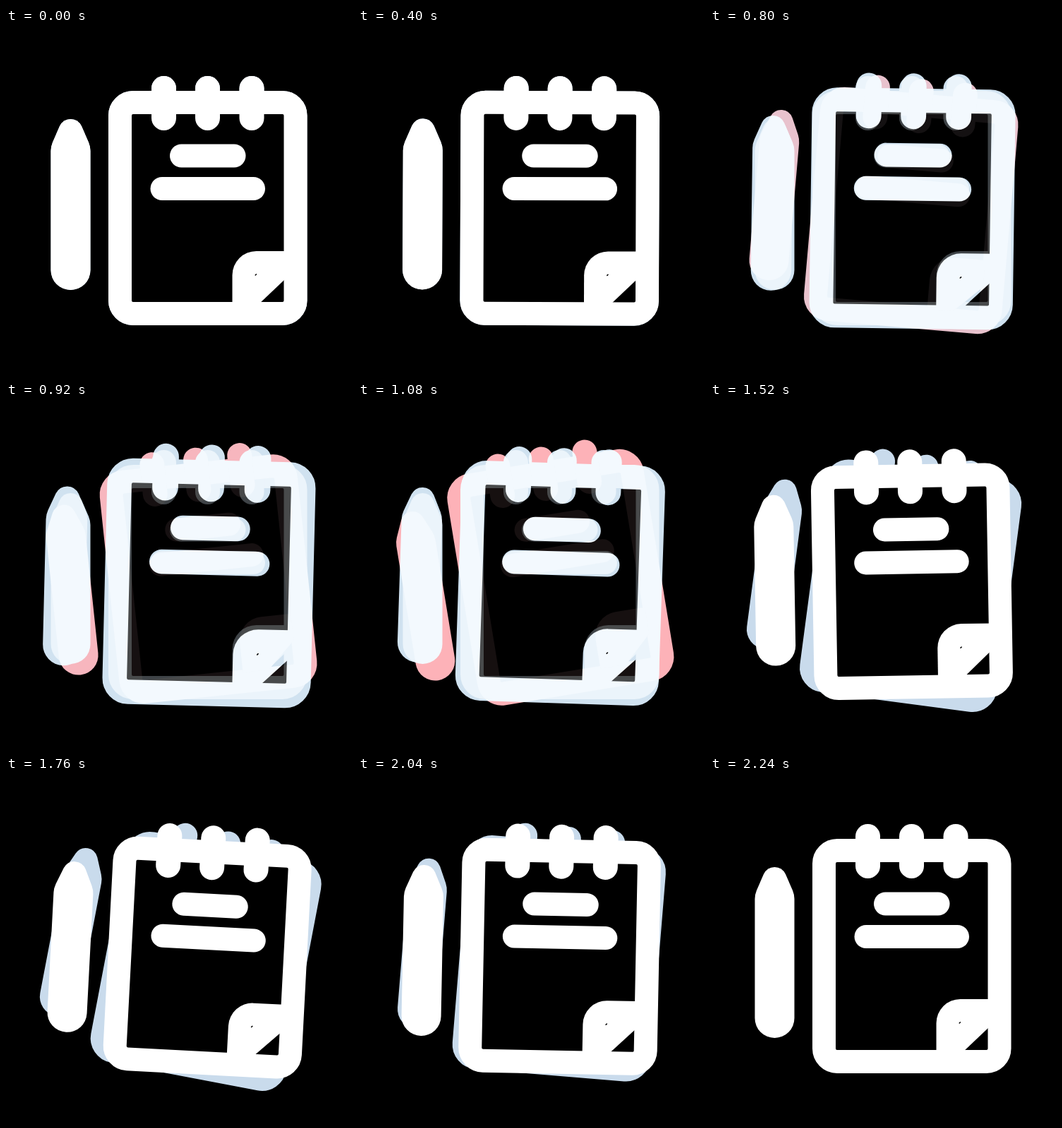
Recreate the animation shown at these times as an HTML page with a canvas. Size 490 by 490 pixels, loop 2.88 s.

```html
<!DOCTYPE html>
<html lang="en">
<head>
<meta charset="utf-8">
<title>Notepad and pen</title>
<style>
  html, body { margin: 0; width: 100%; height: 100%; overflow: hidden; background: #000; }
  canvas { display: block; width: 490px; height: 490px; }
</style>
</head>
<body>
<canvas id="stage" width="490" height="490"></canvas>
<script>
const SIZE = 490, MID = SIZE / 2, LOOP = 2880, STEP = 40;
const ctx = document.getElementById('stage').getContext('2d');
const layer = document.createElement('canvas');
layer.width = layer.height = SIZE;
const lc = layer.getContext('2d');

const WHITE = [255, 255, 255], PINK = [253, 178, 184], HAZE = [201, 219, 236];
const BLUE = [208, 226, 240], MIST = [235, 244, 251], PALE = [243, 249, 254];

// Keys are [time, value]; the curve rests at both ends and at each peak.
const swing = [[360, 0], [400, 0.3], [720, 6.3], [800, 5], [1000, -11.2], [1080, -9.3],
  [1320, 0], [1700, 11.2], [1760, 10.8], [2040, 4.7], [2240, 0]];
const sway = [[360, 0], [400, 0.2], [800, 0.8], [1060, 2], [1320, -4], [1760, 3], [2240, 0]];
const pulse = [[400, 1], [800, 1.024], [940, 1.05], [1080, 1.024], [1260, 1]];
const tint = [[400, 0], [640, 1], [1120, 1], [1280, 0]];
const warm = [[400, 0], [800, 0.6], [1000, 1], [1120, 1], [1300, 0]];

function slope(keys, i) {
  if (i === 0 || i === keys.length - 1) return 0;
  const rate = n => (keys[n + 1][1] - keys[n][1]) / (keys[n + 1][0] - keys[n][0]);
  const a = rate(i - 1), b = rate(i);
  return a * b <= 0 ? 0 : 2 * a * b / (a + b);
}

function track(keys, t) {
  const last = keys.length - 1;
  if (t <= keys[0][0]) return keys[0][1];
  if (t >= keys[last][0]) return keys[last][1];
  let i = 0;
  while (t >= keys[i + 1][0]) i++;
  const [t0, v0] = keys[i], [t1, v1] = keys[i + 1];
  const span = t1 - t0, u = (t - t0) / span, w = 1 - u;
  return v0 * (1 + 2 * u) * w * w + v1 * u * u * (3 - 2 * u)
    + span * u * w * (slope(keys, i) * w - slope(keys, i + 1) * u);
}

const mix = (a, b, k) => a.map((v, i) => v + (b[i] - v) * k);
const rgb = c => `rgb(${c.map(Math.round).join(',')})`;

function place(c, { deg, scale }) {
  c.setTransform(1, 0, 0, 1, MID, MID);
  c.rotate(deg * Math.PI / 180);
  c.scale(scale, scale);
  c.translate(-MID, -MID);
}

function bar(c, x1, y1, x2, y2, width) {
  c.lineWidth = width;
  c.beginPath();
  c.moveTo(x1, y1);
  c.lineTo(x2, y2);
  c.stroke();
}

function cover(c) {
  c.beginPath();
  c.roundRect(161.5, 105.5, 248.5, 299, 18.5);
}

function pen(c) {
  c.beginPath();
  c.moveTo(63.5, 343);
  c.lineTo(63.5, 174);
  c.quadraticCurveTo(63.5, 168, 66, 162);
  c.lineTo(76, 139);
  c.quadraticCurveTo(81, 129, 91.5, 129);
  c.quadraticCurveTo(102, 129, 107, 139);
  c.lineTo(117, 162);
  c.quadraticCurveTo(119.5, 168, 119.5, 174);
  c.lineTo(119.5, 343);
  c.arc(91.5, 343, 28, 0, Math.PI);
  c.fill();
}

function fold(c) {
  c.beginPath();
  c.moveTo(320.5, 392);
  c.lineTo(320.5, 350);
  c.arcTo(320.5, 316, 355, 316, 34);
  c.lineTo(397, 316);
  c.lineTo(397, 354);
  c.lineTo(357, 392);
  c.fill();
}

function ink(c, pose, color) {
  place(c, pose);
  c.fillStyle = c.strokeStyle = rgb(color);
  c.lineCap = 'round';
  cover(c);
  c.lineWidth = 33;
  c.stroke();
  for (const x of [223.5, 285.5, 348]) bar(c, x, 85.5, x, 127.5, 35);
  bar(c, 248.5, 181, 323, 181, 33);
  bar(c, 221, 227.5, 350.5, 227.5, 33);
  fold(c);
  pen(c);
}

// One icon with dark paper; it brightens where it overlaps the icons below.
function sheet(pose, color, below, paper, alpha) {
  place(ctx, pose);
  ctx.globalAlpha = paper;
  ctx.fillStyle = '#000';
  cover(ctx);
  ctx.fill();

  lc.setTransform(1, 0, 0, 1, 0, 0);
  lc.clearRect(0, 0, SIZE, SIZE);
  ink(lc, pose, color);
  lc.globalCompositeOperation = 'source-atop';
  for (const [other, glow] of below) ink(lc, other, glow);
  lc.globalCompositeOperation = 'source-over';
  place(lc, pose);
  lc.strokeStyle = '#000';
  bar(lc, 353.2, 350, 354.4, 348.8, 1.5);

  ctx.setTransform(1, 0, 0, 1, 0, 0);
  ctx.globalAlpha = alpha;
  ctx.drawImage(layer, 0, 0);
  ctx.globalAlpha = 1;
}

function draw(t) {
  const back = { deg: track(swing, t), scale: 1 };
  const rest = { deg: 0, scale: 1 };
  const front = { deg: track(sway, t), scale: track(pulse, t) };
  const shade = track(tint, t);
  const tone = c => mix(WHITE, c, shade);

  ctx.setTransform(1, 0, 0, 1, 0, 0);
  ctx.fillStyle = '#000';
  ctx.fillRect(0, 0, SIZE, SIZE);

  if (t < 2240) ink(ctx, back, mix(HAZE, PINK, track(warm, t)));
  if (shade > 0) sheet(rest, BLUE, [[back, PALE]], 0.7 * shade, shade);
  const below = shade > 0 ? [[rest, tone(MIST)], [back, tone(PALE)]] : [];
  sheet(front, tone(BLUE), below, 1 - 0.3 * shade, 1);
}

const start = performance.now();
function tick() {
  const t = (performance.now() - start) % LOOP;
  draw(Math.floor(t / STEP) * STEP);
  requestAnimationFrame(tick);
}
tick();
</script>
</body>
</html>
```
